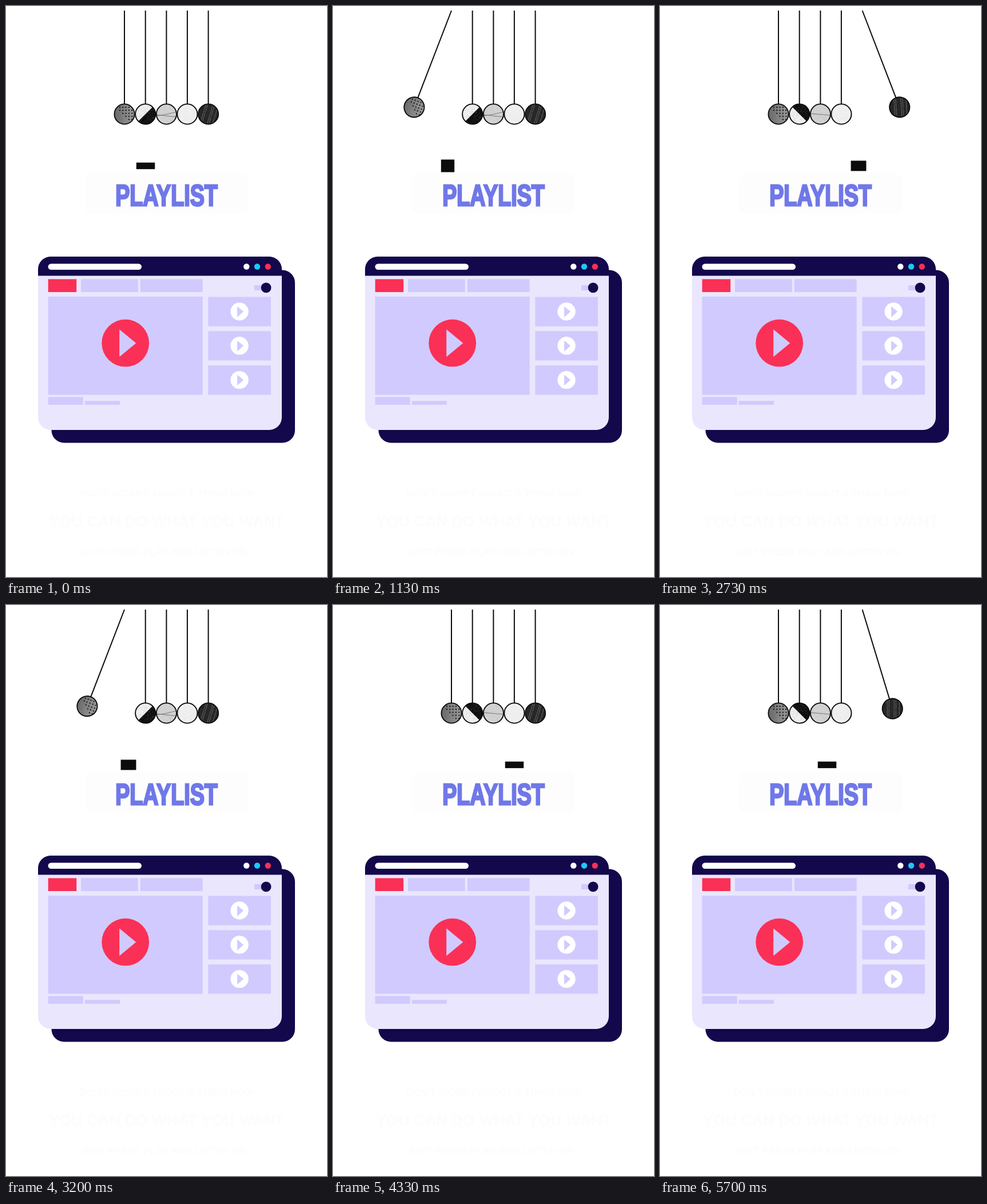
Animation, 561 px wide and 998 px high, one loop 5.73 s. Source, as an HTML page:

```html
<!DOCTYPE html>
<html lang="en">
<head>
<meta charset="utf-8">
<title>Playlist</title>
<style>
  html, body { margin: 0; width: 100%; height: 100%; overflow: hidden; background: #fff; }
  svg { display: block; width: 100vw; height: 100vh; }
  text { font-family: "Liberation Sans", Arial, sans-serif; font-weight: 700; text-anchor: middle; }
  .title { font-size: 52px; fill: #7078e8; stroke: #7078e8; stroke-width: 3; }
  .faint { fill: #fcfcfc; }
  .navy { fill: #13084b; }
  .lilac { fill: #d1cafe; }
  .red { fill: #fa3056; }
  .white { fill: #fff; }
  .string { stroke: #0b0b0b; stroke-width: 2; }
  .rim { fill: none; stroke: #0b0b0b; stroke-width: 1.9; }
  .hair { fill: none; stroke: #777; stroke-width: 1; }
</style>
</head>
<body>
<svg viewBox="0 0 561 998" preserveAspectRatio="none">
  <defs>
    <clipPath id="disc"><circle r="18"/></clipPath>
    <linearGradient id="steel">
      <stop offset="0" stop-color="#686868"/>
      <stop offset="1" stop-color="#a0a0a0"/>
    </linearGradient>
    <g id="play">
      <circle class="white" r="15.7"/>
      <path class="lilac" d="M-4-9 7 0-4 10Z"/>
    </g>
  </defs>

  <rect x="138" y="292" width="285" height="71" rx="12" fill="#fdfdfd"/>
  <text class="title" transform="translate(280.5 348.5) scale(.725 1)">PLAYLIST</text>

  <g class="faint">
    <text x="281" y="858" font-size="17">DON'T WORRY ABOUT A THING NOW</text>
    <text x="281" y="910" font-size="27">YOU CAN DO WHAT YOU WANT</text>
    <text x="275" y="960" font-size="17">JUST PRESS PLAY AND LISTEN ON</text>
  </g>

  <rect class="navy" x="79.5" y="461.5" width="425.5" height="302" rx="22"/>
  <rect x="56" y="438" width="426" height="303" rx="22" fill="#eae6fd"/>
  <path class="navy" d="M56 471.5V460a22 22 0 0 1 22-22H460a22 22 0 0 1 22 22V471.5Z"/>
  <rect class="white" x="73.5" y="450.5" width="163.5" height="10.5" rx="5.25"/>
  <circle class="white" cx="420.3" cy="455.5" r="5.2"/>
  <circle cx="439" cy="455.5" r="5.2" fill="#1cc9f3"/>
  <circle class="red" cx="457.8" cy="455.5" r="5.2"/>

  <rect class="red" x="73.7" y="477.4" width="49.5" height="22.6"/>
  <g class="lilac">
    <rect x="131" y="477.4" width="99.8" height="22.6"/>
    <rect x="234.8" y="477.4" width="108.8" height="22.6"/>
    <rect x="434" y="488" width="14" height="9"/>
    <rect x="73.7" y="508" width="270" height="171.6"/>
    <rect x="353.3" y="508.5" width="109.6" height="51.3"/>
    <rect x="353.3" y="568.3" width="109.6" height="51.3"/>
    <rect x="353.3" y="628.2" width="109.6" height="51.3"/>
    <rect x="73.7" y="683.5" width="61" height="13.5"/>
    <rect x="137.8" y="690.3" width="61.2" height="6.7"/>
  </g>
  <circle class="navy" cx="454.6" cy="492.4" r="8.9"/>
  <use href="#play" x="408.1" y="534"/>
  <use href="#play" x="408.1" y="593.8"/>
  <use href="#play" x="408.1" y="653.6"/>
  <circle class="red" cx="208.7" cy="589.2" r="41.4"/>
  <path class="lilac" d="M198.2 565.3 227.3 589.2 198.2 613.3Z"/>

  <rect id="box" fill="#0c0c0c"/>
  <g id="cradle"></g>
</svg>

<script>
const NS = 'http://www.w3.org/2000/svg';
const LOOP = 5730, CYCLE = 24, SWING = 21.9;
const PIVOT_Y = 8, LENGTH = 181;
const PIVOTS = [207, 243.7, 280.4, 316.9, 353.6];
const FILLS = ['url(#steel)', '#efefef', '#d2d2d2', '#f0f0f0', '#282828'];
const SPECKS = ['#444', '#888', '#9a9a9a', '#c8c8c8', '#000'];

// Box offset from the centre and its height, over one left-to-right pass
const BOX_X = [-81, -77.5, -66.5, -48.5, -11.5, 15, 36.5, 56, 69.5, 77, 80, 81];
const BOX_H = [23, 20.5, 18, 15, 11.5, 10.5, 11.5, 15, 18, 19.5, 22, 23];

function add(parent, tag, attrs) {
  const el = document.createElementNS(NS, tag);
  set(el, attrs);
  return parent.appendChild(el);
}
function set(el, attrs) {
  for (const k in attrs) el.setAttribute(k, attrs[k]);
}

let seed = 7;
const random = () => (seed = seed * 16807 % 2147483647) / 2147483647;

function grain(skin, color) {
  let d = '';
  for (let i = 0; i < 150; i++) {
    d += `M${(random() * 36 - 18).toFixed(1)} ${(random() * 36 - 18).toFixed(1)}h1v1h-1z`;
  }
  add(skin, 'path', { d, fill: color, opacity: .35 });
}

const patterns = [
  skin => {
    for (let row = 0; row < 5; row++) {
      for (let col = 0; col < 5; col++) {
        const x = -8 + col * 5.3, y = -12 + row * 5.3;
        if (x + 8 >= (row - 1) * 4) add(skin, 'circle', { cx: x, cy: y, r: 1.2, fill: '#1c1c1c' });
      }
    }
  },
  skin => add(skin, 'path', { d: 'M-18 18 18-18V18Z', fill: '#0e0e0e' }),
  skin => {
    const left = add(skin, 'path', { class: 'hair', d: 'M-18 1 18 5M-18 3Q0 1 18-4' });
    const right = add(skin, 'path', { class: 'hair', d: 'M-18-1 18 2' });
    skin.show = isLeft => {
      set(left, { opacity: +isLeft });
      set(right, { opacity: +!isLeft });
    };
  },
  () => {},
  skin => add(skin, 'path', {
    class: 'hair', transform: 'rotate(17)',
    d: 'M-9-18V18M-6-18V18M3-18V18M6-18V18M12-18V18', opacity: .8
  })
];

const cradle = document.getElementById('cradle');
const box = document.getElementById('box');
const balls = PIVOTS.map((x, i) => {
  const arm = add(cradle, 'g', {});
  add(arm, 'path', { class: 'string', d: `M0 0V${LENGTH - 18}` });
  const ball = add(arm, 'g', { transform: `translate(0 ${LENGTH})` });
  const skin = add(add(ball, 'g', { 'clip-path': 'url(#disc)' }), 'g', {});
  add(skin, 'circle', { r: 18, fill: FILLS[i] });
  patterns[i](skin);
  grain(skin, SPECKS[i]);
  add(ball, 'circle', { class: 'rim', r: 17.6 });
  return { arm, skin, x };
});
// Keep the top ends of the strings flat
add(cradle, 'rect', { x: 180, y: 0, width: 200, height: PIVOT_Y, fill: '#fff' });

function turn(i, angle) {
  set(balls[i].arm, { transform: `translate(${balls[i].x} ${PIVOT_Y}) rotate(${angle})` });
}

// Fast launch, long hang at the top, fast return
function lift(phase) {
  const q = Math.abs(phase - 6) / 6;
  return q >= 1 ? 0 : SWING * (1 - .31 * q ** 2 - .69 * q ** 5);
}

function draw(frame) {
  const phase = frame % CYCLE, isLeft = phase < 12;
  turn(0, lift(phase));
  turn(4, -lift(phase - 12));
  set(balls[1].skin, { transform: `rotate(${isLeft ? 0 : -90})` });
  balls[2].skin.show(isLeft);

  const step = (phase + 6) % 12;
  const side = phase >= 6 && phase < 18 ? 1 : -1;
  const h = BOX_H[step], w = 22.5 + (23 - h) * .87;
  set(box, { x: 280.5 + side * BOX_X[step] - w / 2, y: 279.4 - h / 2, width: w, height: h });
}

// 25 poses a second, shown on a 30 Hz clock
function tick() {
  const slot = Math.floor((performance.now() % LOOP + 4) * .03);
  draw(Math.floor(slot * 5 / 6));
  requestAnimationFrame(tick);
}
[1, 2, 3].forEach(i => turn(i, 0));
tick();
</script>
</body>
</html>
```
